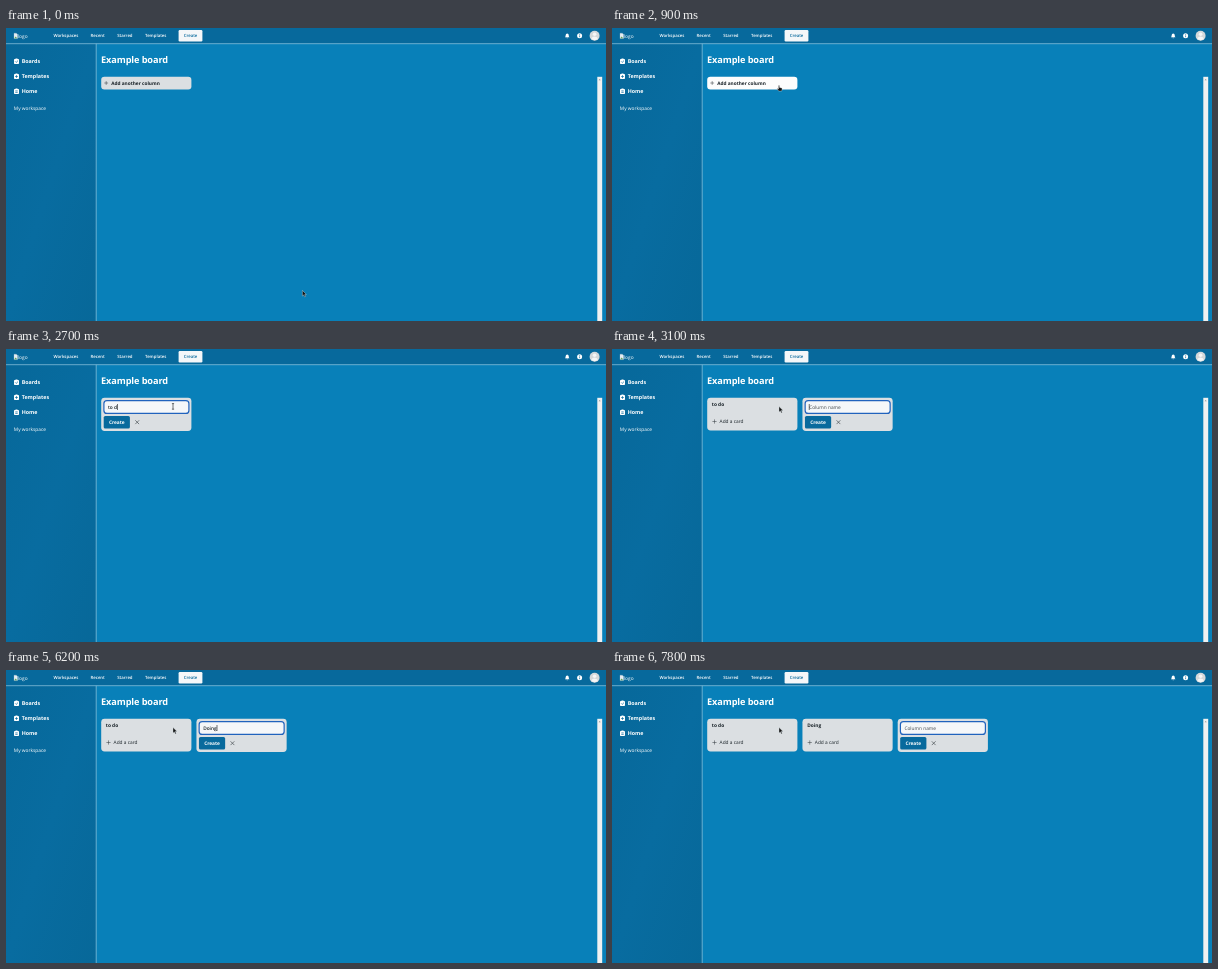
Recreate the animation shown at these times as an HTML page. Size 600 by 293 pixels, loop 8 s.

```html
<!DOCTYPE html>
<html lang="en">
<head>
<meta charset="utf-8">
<title>Example board</title>
<style>
  html, body { margin: 0; width: 100%; height: 100%; overflow: hidden; background: #0880b9; }
  svg { display: block; width: 600px; height: 293px; }
  text { font-family: "Open Sans", "Noto Sans", sans-serif; font-size: 4.82px; text-rendering: geometricPrecision; white-space: pre; }
  .nav { fill: #fff; font-size: 4.32px; font-weight: 600; }
  .side { fill: #fff; font-size: 5.33px; font-weight: 700; }
  .bold { font-weight: 700; }
  .ink { fill: #172026; }
  .line { fill: none; stroke: #3c4348; stroke-width: .55; }
  .hide { display: none; }
</style>
</head>
<body>
<svg viewBox="0 0 600 293">
  <defs>
    <linearGradient id="panel" x1="0" y1="0" x2="1" y2="1">
      <stop offset="0" stop-color="#07689a"/>
      <stop offset=".5" stop-color="#086ca0"/>
      <stop offset="1" stop-color="#076899"/>
    </linearGradient>
    <g id="column">
      <rect x="95.2" y="48.8" width="90.2" height="32.6" rx="3.4" fill="#dbdfe2"/>
      <path class="line" d="M100.4 72.5h4.2M102.5 70.4v4.2"/>
      <text class="ink" x="107.6" y="74.4">Add a card</text>
    </g>
  </defs>

  <rect width="600" height="293" fill="#0880b9"/>
  <rect y="15" width="90" height="278" fill="url(#panel)"/>
  <rect width="600" height="15.5" fill="#07699c"/>
  <path d="M0 15.7H600M90.2 15.7V293" stroke="#83bbd8" stroke-width=".8"/>

  <g id="alt-logo">
    <path d="M8 5.2h2.4l1.2 1.2v4.2H8z" fill="#e6eef3" stroke="#a9bfcc" stroke-width=".3"/>
    <path d="M8.3 10.2l1.3-1.7 1.6 1.7z" fill="#5da556"/>
    <text x="11.9" y="9.8" fill="#fff" font-size="5">logo</text>
  </g>
  <text class="nav" x="47.4" y="9.3">Workspaces</text>
  <text class="nav" x="84.5" y="9.3">Recent</text>
  <text class="nav" x="111.2" y="9.3">Starred</text>
  <text class="nav" x="139" y="9.3">Templates</text>
  <rect x="172.6" y="2.1" width="23.8" height="11.4" rx="1.2" fill="#f4f7f9"/>
  <text class="nav" x="184.5" y="9.4" text-anchor="middle" style="fill:#086a9d">Create</text>

  <path d="M558.9 9.3q.8-.6.8-2.3a1.5 1.5 0 0 1 3 0q0 1.7.8 2.3zM560.5 9.7h1.4q-.7 1-1.4 0z" fill="#fff"/>
  <circle cx="573.6" cy="7.7" r="2.5" fill="#fff"/>
  <path d="M573.6 6.2v.7M573.6 7.4v1.8" stroke="#07699c" stroke-width=".7"/>
  <circle cx="588.6" cy="7.7" r="5" fill="#d5d8da"/>
  <path d="M585.3 11.1q.4-2.5 3.3-2.5t3.3 2.5q-3.3 2.3-6.6 0z" fill="#f6f6f6"/>
  <circle cx="588.6" cy="6.3" r="1.8" fill="#f6f6f6"/>

  <g fill="#fff">
    <rect x="8" y="31" width="5" height="5" rx=".7"/>
    <rect x="8" y="46" width="5" height="5" rx=".7"/>
    <rect x="8" y="61" width="5" height="5" rx=".7"/>
    <path d="M9.5 30.5h2v1h-2zM9.5 45.5h2v1h-2zM9.5 60.5h2v1h-2z"/>
  </g>
  <path d="M9.2 33.4l1 1 1.8-1.8M9.1 48.5h2.8M10.5 47.1v2.8M9.3 62.9h2.4M9.3 64.4h2.4" fill="none" stroke="#07699c" stroke-width=".7"/>
  <text class="side" x="15.7" y="35.3">Boards</text>
  <text class="side" x="15.7" y="50.3">Templates</text>
  <text class="side" x="15.7" y="65.3">Home</text>
  <text x="7.8" y="81.8" fill="#fff">My workspace</text>

  <text class="bold" x="95" y="35.4" fill="#fff" style="font-size:9.2px;letter-spacing:-.1px">Example board</text>

  <rect x="591.3" y="48.8" width="4.9" height="245" fill="#f0f1f1"/>
  <path d="M592.7 52.2l1-1.2 1 1.2z" fill="#8b8b8b"/>

  <g id="add">
    <rect id="addBox" x="95.2" y="48.8" width="90.2" height="12.6" rx="3.2"/>
    <path class="line" d="M98.3 55h3.8M100.2 53.1v3.8"/>
    <text class="ink bold" x="105.2" y="56.8" style="font-size:4.75px">Add another column</text>
  </g>

  <g id="todo">
    <use href="#column"/>
    <text class="ink bold" x="99.8" y="57">to do</text>
  </g>
  <g id="doing">
    <use href="#column" x="95.25"/>
    <text class="ink bold" x="195.3" y="57">Doing</text>
  </g>

  <g id="form">
    <rect x="95.2" y="48.8" width="90.2" height="33.2" rx="3.4" fill="#dbdfe2"/>
    <rect x="97.9" y="51.6" width="85" height="12.8" rx="3" fill="#f5f7f9" stroke="#2163bd" stroke-width="1.2"/>
    <text id="hint" x="101.9" y="59.8" fill="#42484d" style="font-weight:500">Column name</text>
    <text id="typed" class="ink" x="101.9" y="59.8" style="font-weight:600"></text>
    <rect id="caret" y="55" width=".6" height="6" fill="#101418"/>
    <rect x="97.7" y="66.9" width="26.2" height="12.6" rx="1.6" fill="#086a9d"/>
    <text class="bold" x="110.8" y="74.9" text-anchor="middle" fill="#fff">Create</text>
    <path class="line" d="M129.3 71.3l3.8 3.8M133.1 71.3l-3.8 3.8" style="stroke-width:.65"/>
  </g>

  <path id="arrow" d="M0 0V5.6L1.4 4.5 2.3 6.5 3.2 6.1 2.3 4.1H4z" fill="#111" stroke="#d5dde2" stroke-width=".4"/>
  <path id="hand" d="M-.5 .3Q0-.4.5.3V2l2 .5q.7.2.6 1L2.7 5.7H-.3L-1.9 3.4q.2-.7 1.4.2z" fill="#111" stroke="#e2e2e2" stroke-width=".35"/>
  <path id="beam" d="M-1.1-2.8h2.2M0-2.8v5.6M-1.1 2.8h2.2" fill="none" stroke="#25292c" stroke-width=".65"/>
</svg>

<script>
const LOOP = 8000, OPEN = 1000, FIRST = 3100, SECOND = 6400, STEP = 95.25;
const $ = id => document.getElementById(id);
const show = (id, on) => $(id).classList.toggle('hide', !on);

// [time, input text, caret visible]
const script = [
  [OPEN, '', 1], [1900, '', 0],
  [2300, 't', 1], [2400, 'to', 1], [2600, 'to ', 1], [2700, 'to d', 1], [2800, 'to do', 1],
  [FIRST, '', 1], [3400, '', 0], [4000, '', 1], [4600, '', 0],
  [5200, 'D', 1], [5500, 'Do', 1], [5700, 'Doi', 1], [5800, 'Doin', 1], [6200, 'Doing', 1],
  [SECOND, '', 1], [6900, '', 0]
];

function drawForm(t) {
  const [, value, caret] = script.findLast(step => step[0] <= t);
  const slot = (t >= FIRST) + (t >= SECOND);
  $('form').setAttribute('transform', `translate(${slot * STEP})`);
  $('typed').textContent = value;
  show('hint', !value);
  show('caret', caret);
  $('caret').setAttribute('x', 101.6 + (value ? $('typed').getComputedTextLength() + .3 : 0));
}

function drawPointer(t) {
  const p = Math.min(1, Math.floor(t / 100) / 9);
  const ease = p * p * (3 - 2 * p);
  const x = 296.4 + (167 - 296.4) * ease;
  const y = 262.4 + (57.4 - 262.4) * ease;
  const hover = y < 61.4 && x < 185.4;
  const kind = t >= FIRST ? 'arrow' : t >= OPEN ? 'beam' : hover ? 'hand' : 'arrow';
  for (const id of ['arrow', 'hand', 'beam']) show(id, id === kind);
  $(kind).setAttribute('transform', `translate(${x} ${y})`);
  $('addBox').setAttribute('fill', hover ? '#fdfdfd' : '#dbdfe2');
}

function frame(now) {
  const t = now % LOOP;
  show('add', t < OPEN);
  show('form', t >= OPEN);
  show('todo', t >= FIRST);
  show('doing', t >= SECOND);
  if (t >= OPEN) drawForm(t);
  drawPointer(t);
  requestAnimationFrame(frame);
}
frame(0);
</script>
</body>
</html>
```
